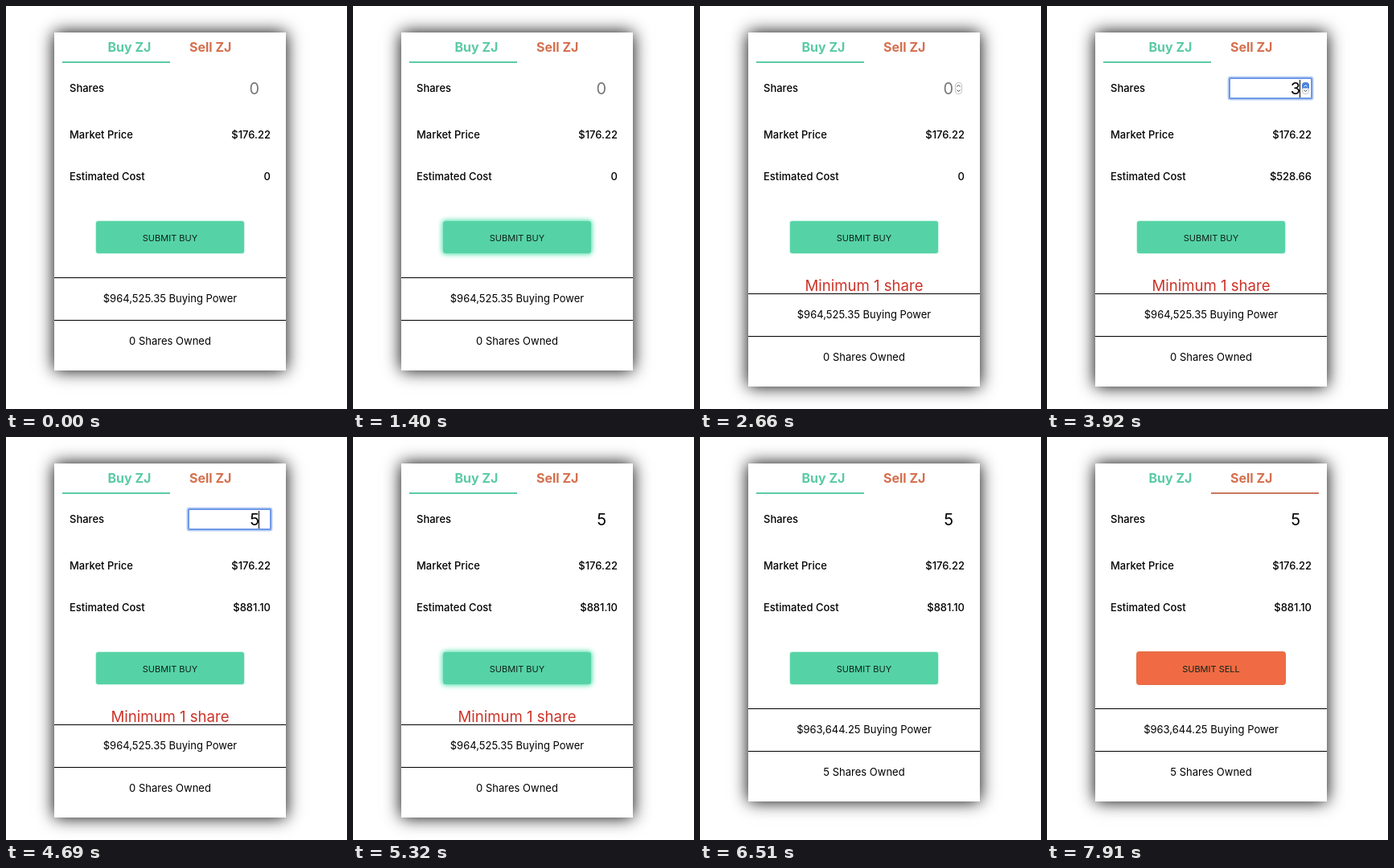
An HTML page for the animation above (8000 ms loop, 424 by 502 pixels).

```html
<!DOCTYPE html>
<html lang="en">
<head>
<meta charset="utf-8">
<title>Trade form</title>
<style>
  html, body { margin: 0; width: 100%; height: 100%; overflow: hidden; background: #fff; }
  #stage { position: relative; width: 424px; height: 502px; overflow: hidden; }
  #card { position: absolute; left: 60px; top: 33px; width: 288px; height: 421px; background: #fff; box-shadow: 0 0 20px #000; }
  #btn { position: absolute; left: 112px; top: 268px; width: 184px; height: 40px; border-radius: 3px; }
  svg { position: absolute; left: 0; top: 0; }
  text { font: 500 13px Inter, sans-serif; fill: #000; }
  .tab { font-size: 16px; font-weight: 700; }
  .mid { text-anchor: middle; }
  .end { text-anchor: end; }
  .foot { font-weight: 400; }
  #label { font-size: 11px; font-weight: 400; fill: #10231c; }
  #qty { font-size: 20px; font-weight: 400; }
  #error { font-size: 18.6px; font-weight: 400; fill: #cc3329; }
</style>
</head>
<body>
<div id="stage">
  <div id="card"></div>
  <div id="btn"></div>
  <svg width="424" height="502" viewBox="0 0 424 502">
    <text class="tab" x="126.5" y="57" style="fill:#5bcaa7">Buy ZJ</text>
    <text class="tab" x="228" y="57" style="fill:#d4704f">Sell ZJ</text>
    <rect id="line" y="69" width="134" height="2"/>
    <text x="79" y="107">Shares</text>
    <text x="79" y="165">Market Price</text>
    <text x="79" y="217">Estimated Cost</text>
    <text class="end" x="329" y="165">$176.22</text>
    <text class="end" id="cost" x="329" y="217"></text>
    <g id="ring" fill="none">
      <rect x="226" y="89" width="104" height="27" rx="2" stroke="#b9cff4" stroke-width="3"/>
      <rect x="227" y="90" width="102" height="25" rx="1" stroke="#6f9ae6" stroke-width="2"/>
    </g>
    <text class="end" id="qty" x="315" y="110"></text>
    <rect id="caret" x="314" y="92" width="1" height="22"/>
    <g id="spin" fill="none">
      <rect x="317.5" y="95.5" width="8" height="14" rx="3.5" fill="#fff" stroke="#c4c4c4"/>
      <path id="press" d="M317 102.5V99a4 4 0 0 1 4-4h1a4 4 0 0 1 4 4v3.5z" fill="#4a83dc"/>
      <path id="up" d="M319.5 100.5l2-2 2 2"/>
      <path d="M319.5 104.5l2 2 2-2" stroke="#444"/>
    </g>
    <text class="mid" id="label" x="204" y="293"></text>
    <text class="mid" id="error" x="204" y="355">Minimum 1 share</text>
    <g id="foot">
      <path d="M60 338.5h288M60 391.5h288" stroke="#000"/>
      <text class="mid foot" id="power" x="204" y="369"></text>
      <text class="mid foot" id="owned" x="204" y="422"></text>
    </g>
  </svg>
</div>
<script>
const LOOP = 8000, PRICE = 176.22, CASH = 964525.35;
const $ = id => document.getElementById(id);
const money = n => '$' + n.toLocaleString('en-US', { minimumFractionDigits: 2, maximumFractionDigits: 2 });

const START = { qty: 0, owned: 0, hover: 0, error: 0, spin: 0, focus: 0, press: 0, sell: 0, typed: 0 };
const click = (time, qty) => [
  [time, { qty, press: 1, typed: time }],
  [time + 140, { press: 0 }]
];
const STEPS = [
  [1400, { hover: 1 }],
  [1890, { error: 1 }],
  [2380, { hover: 0 }],
  [2660, { spin: 1 }],
  [3220, { focus: 1 }],
  ...click(3220, 1),
  ...click(3640, 2),
  ...click(3880, 3),
  ...click(4130, 4),
  ...click(4340, 5),
  [4690, { spin: 0 }],
  [4970, { hover: 1 }],
  [5320, { focus: 0 }],
  [5390, { error: 0 }],
  [5670, { owned: 5 }],
  [6510, { hover: 0 }],
  [6650, { spin: 1 }],
  [6790, { spin: 0 }],
  [7140, { sell: 1 }],
  [7700, { spin: 1 }],
  [7910, { spin: 0 }]
];

const show = (id, on) => $(id).style.display = on ? '' : 'none';
const write = (id, text) => { if ($(id).textContent !== text) $(id).textContent = text; };

function draw(time) {
  const s = { ...START };
  for (const [at, change] of STEPS) if (at <= time) Object.assign(s, change);

  $('card').style.height = (s.error ? 441 : 421) + 'px';
  $('foot').setAttribute('transform', `translate(0 ${s.error ? 20 : 0})`);
  show('error', s.error);

  $('line').setAttribute('x', s.sell ? 204 : 70);
  $('line').setAttribute('fill', s.sell ? '#c9765d' : '#5bcaa7');
  const color = s.sell ? '#f06b43' : '#56d3a6';
  $('btn').style.background = color;
  $('btn').style.boxShadow = s.hover ? '0 0 6px 1px #3fdca4' : s.sell ? '0 0 0 1px #e0704d' : '0 0 2px #56d3a6';
  write('label', s.sell ? 'SUBMIT SELL' : 'SUBMIT BUY');

  write('qty', String(s.qty));
  $('qty').style.fill = s.qty ? '#000' : '#777';
  write('cost', s.qty ? money(s.qty * PRICE) : '0');
  write('power', money(CASH - s.owned * PRICE) + ' Buying Power');
  write('owned', s.owned + ' Shares Owned');

  show('ring', s.focus);
  show('caret', s.focus && (time - s.typed) % 1000 < 500);
  show('spin', s.spin);
  show('press', s.press);
  $('up').setAttribute('stroke', s.press ? '#fff' : '#444');
}

const begin = performance.now();
function tick() {
  draw((performance.now() - begin) % LOOP);
  requestAnimationFrame(tick);
}
tick();
</script>
</body>
</html>
```
